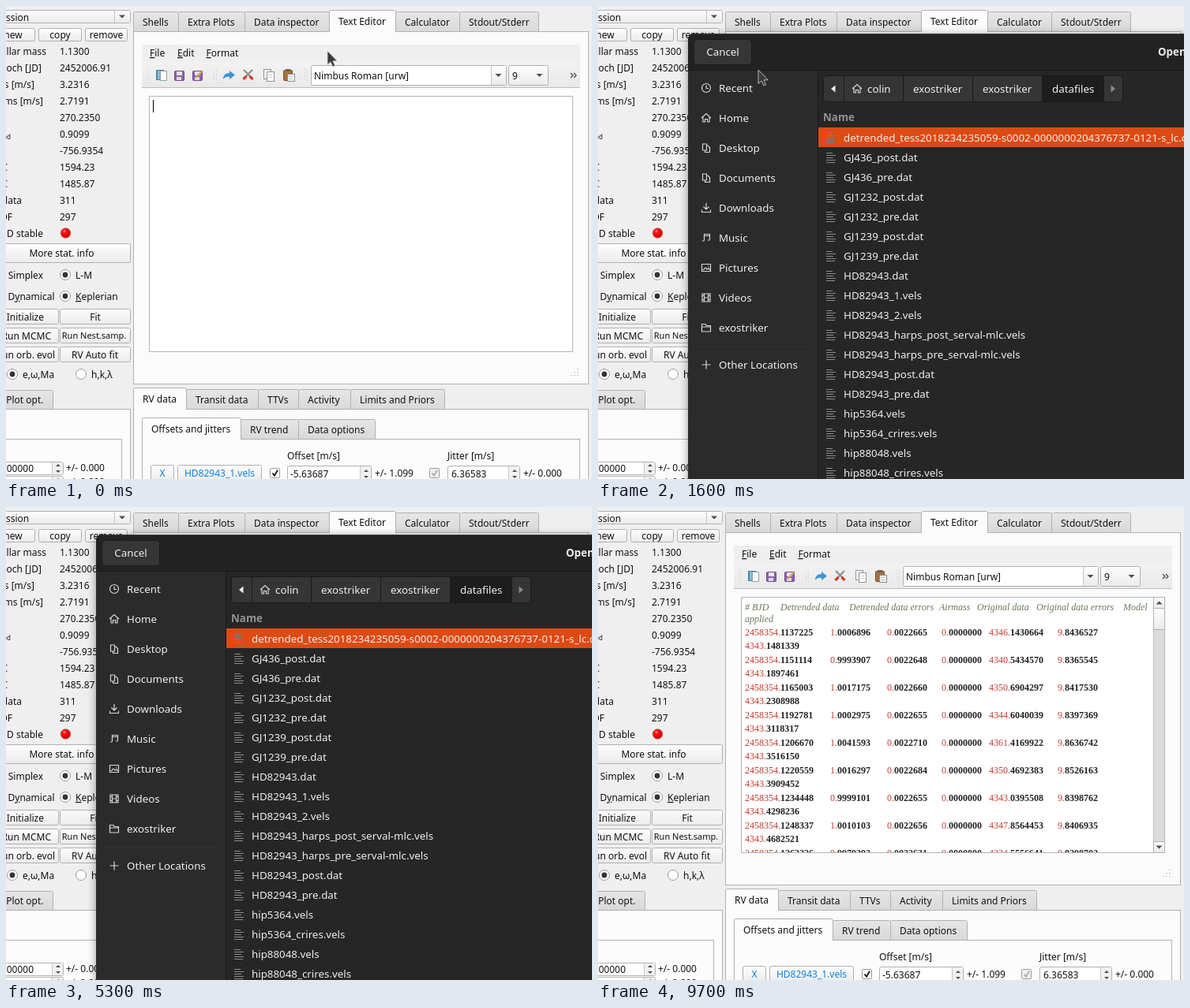
An HTML page that plays this animation: 742x600 px, repeating every 9900 ms.

```html
<!DOCTYPE html>
<html lang="en">
<head>
<meta charset="utf-8">
<title>Text editor: open file</title>
<style>
html, body { margin: 0; width: 100%; height: 100%; overflow: hidden; background: #efefef; }
svg { display: block; width: 742px; height: 600px; font: 12px "Noto Sans", sans-serif; fill: #111; }
text { white-space: pre; }
.u { text-decoration: underline; }
.dialog { font-size: 13.33px; fill: #eee; }
.doc { font: 12px "Liberation Serif", serif; }
</style>
</head>
<body>
<svg id="stage" viewBox="0 0 742 600">
  <defs>
    <linearGradient id="btn" x2="0" y2="1"><stop stop-color="#fdfdfd"/><stop offset="1" stop-color="#ebebeb"/></linearGradient>
    <linearGradient id="tab" x2="0" y2="1"><stop stop-color="#e6e6e6"/><stop offset="1" stop-color="#d9d9d9"/></linearGradient>
    <linearGradient id="bar" x2="0" y2="1"><stop stop-color="#f2f2f2"/><stop offset="1" stop-color="#e9e9e9"/></linearGradient>
    <radialGradient id="led" cx=".38" cy=".32"><stop stop-color="#ff9c9c"/><stop offset=".35" stop-color="#ff1515"/><stop offset="1" stop-color="#e00000"/></radialGradient>
    <filter id="soft" x="-10%" y="-10%" width="120%" height="120%"><feGaussianBlur stdDeviation="6"/></filter>
    <clipPath id="page"><path d="M182 115H703V438H182Z"/></clipPath>
  </defs>
  <g id="app"></g>
  <g id="highlight"></g>
  <text id="status" x="178" y="464">Open file</text>
  <g id="doc"></g>
  <path id="caret" d="M186.5 119V135" stroke="#000"/>
  <g id="dialog" class="dialog"></g>
  <path id="cursor" d="M0 0V17.5L4 14L6.8 20L9.6 18.7L7 12.8H12.3Z" fill="#3a3a3a" stroke="#d8d8d8" stroke-width=".8"/>
</svg>
<script>
const $ = id => document.getElementById(id);
const EDGE = '#b1b1b1';

const text = (x, y, s, attrs = '') => `<text x="${x}" y="${y}" ${attrs}>${s}</text>`;
const mid = (x, y, s, attrs = '') => text(x, y, s, `text-anchor="middle" ${attrs}`);
const end = (x, y, s, attrs = '') => text(x, y, s, `text-anchor="end" ${attrs}`);
const fillRect = (x, y, w, h, fill) => `<rect x="${x}" y="${y}" width="${w}" height="${h}" fill="${fill}"/>`;
const box = (x1, y1, x2, y2, fill, stroke = EDGE, r = 0) =>
  `<rect x="${x1 + .5}" y="${y1 + .5}" width="${x2 - x1 - 1}" height="${y2 - y1 - 1}" rx="${r}" fill="${fill}" stroke="${stroke}"/>`;
const line = (d, stroke = '#555', width = 1, fill = 'none') =>
  `<path d="${d}" fill="${fill}" stroke="${stroke}" stroke-width="${width}"/>`;
const shape = (d, fill) => `<path d="${d}" fill="${fill}"/>`;
const down = (x, y, s = 4) => shape(`M${x - s} ${y - s / 2}h${2 * s}l${-s} ${s}z`, '#4d4d4d');
const up = (x, y, s = 4) => shape(`M${x - s} ${y + s / 2}h${2 * s}l${-s} ${-s}z`, '#4d4d4d');
const under = s => `<tspan class="u">${s[0]}</tspan>${s.slice(1)}`;

const button = (x1, y1, x2, y2) => box(x1, y1, x2, y2, 'url(#btn)', EDGE, 2);

function tabs(list, top, bottom, active) {
  const draw = ([x1, x2, tx, label], i) => {
    const on = i === active, y = on ? top - 2 : top, b = on ? bottom + 1 : bottom;
    return line(`M${x1 + .5} ${b}V${y + 2.5}q0-2 2-2H${x2 - 1.5}q2 0 2 2V${b}`, EDGE, 1, on ? '#fcfcfc' : 'url(#tab)')
      + text(tx, on ? bottom - 8 : bottom - 7, label);
  };
  return list.map((t, i) => i === active ? '' : draw(t, i)).join('') + draw(list[active], active);
}

const radio = (x, y, on) =>
  `<circle cx="${x}" cy="${y}" r="6.5" fill="#fff" stroke="#999"/>` + (on ? `<circle cx="${x}" cy="${y}" r="3.4" fill="#333"/>` : '');

const check = (x, y, ink, fill) => box(x, y, x + 13, y + 13, fill, '#9a9a9a', 1)
  + line(`M${x + 3.5} ${y + 6.5}l2.5 3.2l4-7`, ink, 1.8);

const spin = (x1, y1, x2, y2) => {
  const x = x2 - 7, y = (y1 + y2) / 2;
  return box(x1, y1, x2, y2, '#fff', EDGE, 2) + fillRect(x2 - 14, y1 + 1, 13, y2 - y1 - 2, '#f1f1f1')
    + line(`M${x2 - 14.5} ${y1 + 1}V${y2 - 1}`, '#c6c6c6') + up(x, y - 4, 3) + down(x, y + 4, 3);
};

const combo = (x1, y1, x2, y2, sep, fill) => box(x1, y1, x2, y2, fill, EDGE, 2)
  + (sep ? fillRect(sep, y1 + 1, x2 - sep - 1, y2 - y1 - 2, 'url(#btn)') + line(`M${sep + .5} ${y1 + 1}V${y2 - 1}`, '#c2c2c2') : '');

function leftPanel() {
  const labels = [[51, 'Stellar mass', '1.1300'], [45, 'Epoch [JD]', '2452006.91'], [36, 'rms [m/s]', '3.2316'],
    [47, 'wrms [m/s]', '2.7191'], [0, '', '270.2350'], [0, '', '0.9099'], [0, '', '-756.9354'], [2, 'BIC', '1594.23'],
    [2, 'AIC', '1485.87'], [20, 'N data', '311'], [8, 'DOF', '297'], [47, 'AMD stable', '']];
  let s = combo(-9, 5, 158, 22, 137, 'url(#btn)') + down(147, 13.5) + text(0, 18.5, 'ssion');
  s += button(-9, 28, 37, 45) + button(41, 28, 96, 45) + button(100, 28, 154, 45);
  s += mid(9, 41, 'new') + mid(68.5, 41, 'copy') + mid(127, 41, 'remove');
  labels.forEach(([x, name, value], i) => { s += end(x, 62 + 21 * i, name) + text(68, 62 + 21 * i, value); });
  s += end(6, 168.5, 'red', 'font-size="8"') + '<circle cx="75.5" cy="288" r="6.5" fill="url(#led)" stroke="#a9a9a9" stroke-width=".6"/>';
  s += button(-9, 301, 158, 326) + mid(70.5, 318, 'More stat. info');
  s += end(47, 346, 'Simplex') + radio(75, 341, 1) + text(88, 346, 'L-M');
  s += end(61.5, 373, 'D<tspan class="u">y</tspan>namical') + radio(75, 368, 1) + text(88, 373, under('Keplerian'));
  for (const y of [384, 408, 432]) s += button(-9, y, 67, y + 20) + button(68, y, 158, y + 20);
  s += end(48, 399, 'Initialize') + mid(113, 399, 'Fit') + end(57, 423, 'Run MCMC');
  s += mid(111.5, 422, 'Run Nest.samp.', 'font-size="11"') + end(62, 447, 'Run orb. evol') + mid(112.5, 447, 'RV Auto fit');
  s += radio(8, 467, 1) + text(21, 472, 'e,ω,Ma') + radio(95, 467, 0) + text(108, 472, 'h,k,λ');
  s += line('M-5 511V487.5H57.5q2 0 2 2V511', EDGE, 1, 'url(#tab)') + end(47.5, 504, 'Plot opt.');
  s += box(-9, 511, 158, 620, '#fcfcfc') + box(-9, 549, 147, 620, '#fcfcfc');
  for (const y of [578, 596]) s += spin(-9, y, 73, y + 17) + end(35, y + 12.5, '0.00000') + text(76, y + 12, '+/- 0.000');
  return s;
}

function toolIcons() {
  const floppy = x => box(x - 6, 82, x + 7, 95, '#8b62ad', '#6d4a8c', 1) + fillRect(x - 3, 83, 7, 5, '#e9e2f0') + fillRect(x - 3, 90, 6, 4, '#ddd');
  let s = box(190, 81, 200, 94, '#5f9fbd', '#47809b') + box(195, 82, 204, 95, '#f8f8f8', '#8fa5b0') + line('M193.5 82V93', '#bfe0ee');
  s += floppy(219) + floppy(242) + line('M240 91L249 82', '#d0a24c', 2.2);
  s += shape('M275 93q0-8 8-8v-3l7 5.5l-7 5.5v-3q-5-1-8 3z', '#3d94d8');
  s += line('M301 81L311 91M312 81L302 91', '#8b8b8b', 2) + line('M304.5 89l-4 4M308.5 89l4 4', '#d83a32', 3.2);
  s += box(326, 80, 336, 93, '#fafafa', '#8d9298') + box(330, 83, 340, 96, '#fff', '#8d9298') + line('M332 87.5h5M332 90.5h5', '#ccc');
  s += box(351, 81, 363, 95, '#a8703d', '#77502d', 1) + fillRect(354, 80, 6, 3, '#666') + box(356, 86, 366, 96, '#f6f6f6', '#888') + line('M358 89.5h5M358 92.5h5', '#bbb');
  return s;
}

function rightPanel() {
  let s = box(161, 32, 738, 480, '#fbfbfb');
  s += tabs([[161, 218, 173, 'Shells'], [218, 302, 230, 'Extra Plots'], [302, 409, 314, 'Data inspector'], [409, 493, 421, 'Text Editor'],
    [493, 574, 505, 'Calculator'], [574, 674, 586, 'Stdout/Stderr']], 7, 32, 3);
  s += fillRect(172, 49, 555, 22, '#efefef') + fillRect(172, 71, 555, 32, 'url(#bar)') + line('M172 103.5H727', '#bdbdbd');
  s += text(182, 64, under('File')) + text(217, 64, under('Edit')) + text(253.5, 64, under('Format'));
  for (const x of [178, 263, 378]) s += line(`M${x + .5} 80V96M${x + 3.5} 81.5V96`, '#bcbcbc').replace('/>', ' stroke-dasharray="1 3"/>');
  s += toolIcons() + combo(386, 75, 634, 101, 614, '#fff') + text(390, 93, 'Nimbus Roman [urw]') + down(623.5, 88);
  s += combo(636, 75, 687, 101, 0, 'url(#btn)') + text(641, 93, '9') + down(675.5, 88);
  s += line('M715 85l3 3l-3 3M719 85l3 3l-3 3', '#444', 1.2);
  s += box(181, 114, 718, 439, '#fff', '#b4b4b4');
  for (let i = 0; i < 3; i++) s += line(`M${723 - 4 * i} ${460.5 + 0 * i}`, '#bbb');
  s += line('M723 460.5h2M719 464.5h2M723 464.5h2M715 468.5h2M719 468.5h2M723 468.5h2', '#c0c0c0');

  s += box(161, 511, 738, 620, '#fbfbfb');
  s += tabs([[161, 228, 173, 'RV data'], [228, 319, 240, 'Transit data'], [319, 370, 331, 'TTVs'], [370, 436, 382, 'Activity'],
    [436, 555, 448, 'Limits and Priors']], 486, 511, 0);
  s += box(172, 549, 727, 620, '#fcfcfc');
  s += tabs([[172, 297, 184, 'Offsets and jitters'], [297, 370, 309, 'RV trend'], [370, 467, 382, 'Data options']], 524, 549, 0);
  s += text(356, 575, 'Offset [m/s]') + text(559, 575, 'Jitter [m/s]');
  s += button(183, 582, 213, 604) + button(217, 582, 324, 604);
  s += mid(198, 597, 'X', 'fill="#1180d8"') + mid(270.5, 597, 'HD82943_1.vels', 'fill="#1180d8"');
  s += check(334, 586, '#111', '#fff') + spin(356, 583, 463, 604) + text(360, 598, '-5.63687') + text(467, 597, '+/- 1.099');
  s += check(536, 586, '#aaa', '#f0f0f0') + spin(559, 583, 651, 604) + text(564, 598, '6.36583') + text(655, 597, '+/- 0.000');
  return s;
}

function documentText() {
  const heads = [[186, '# BJD'], [231, 'Detrended data'], [318, 'Detrended data errors'], [432, 'Airmass'], [480, 'Original data'],
    [555, 'Original data errors'], [665, 'Model']];
  const rows = `1137225 1.0006896 0.0022665 4346.1430664 9.8436527 4343.1481339
1151114 0.9993907 0.0022648 4340.5434570 9.8365545 4343.1897461
1165003 1.0017175 0.0022660 4350.6904297 9.8417530 4343.2308988
1192781 1.0002975 0.0022655 4344.6040039 9.8397369 4343.3118317
1206670 1.0041593 0.0022710 4361.4169922 9.8636742 4343.3516150
1220559 1.0016297 0.0022684 4350.4692383 9.8526163 4343.3909452
1234448 0.9999101 0.0022655 4343.0395508 9.8398762 4343.4298236
1248337 1.0010103 0.0022656 4347.8564453 9.8406935 4343.4682521
1262226 0.9979392 0.0022631 4334.5556641 9.8298702 4343.5062321`.split('\n');
  const number = (x, y, n) => {
    const [a, b] = n.split('.');
    return text(x, y, `${a}.<tspan fill="#222" font-weight="bold">${b}</tspan>`, 'fill="#c23b30"');
  };
  let s = '<g font-style="italic" fill="#66795a">' + heads.map(([x, h]) => text(x, 131, h)).join('') + text(186, 146, 'applied') + '</g>';
  rows.forEach((row, i) => {
    const [bjd, flux, err, raw, rawErr, model] = row.split(' '), y = 163 + 35 * i;
    s += number(186, y, '2458354.' + bjd) + number(294, y, flux) + number(366, y, err) + number(435, y, '0.0000000')
      + number(495, y, raw) + number(582, y, rawErr) + number(186, y + 17, model);
  });
  return `<g class="doc" clip-path="url(#page)">${s}</g>` + fillRect(703, 115, 14, 323, '#dcdcdc') + line('M703.5 115V438', '#c2c2c2')
    + box(703, 114, 718, 129, 'url(#btn)') + box(703, 128, 718, 156, 'url(#btn)') + box(703, 424, 718, 439, 'url(#btn)')
    + up(710.5, 121.5) + down(710.5, 431.5);
}

function dialogWindow() {
  const ink = '#d6d6d6';
  const home = 'M-6 0L0-5.5L6 0M-4-1V5H-1.5V1.5H1.5V5H4V-1';
  const pages = 'M-4.5-5H0.5V3H-4.5ZM-1.5 3V5.5H4.5V-.5L2-3H.5';
  const places = [
    ['Recent', 'M5.5 0A5.5 5.5 0 1 1-5.5 0A5.5 5.5 0 1 1 5.5 0M0-3.5V.5H3'], ['Home', home], ['Desktop', pages], ['Documents', pages],
    ['Downloads', 'M0-6V2M-3.5-1.5L0 2L3.5-1.5M-5.5 2.5V5.5H5.5V2.5'],
    ['Music', 'M-2.5 3.5V-4.5H4.5V2.5M-2.5-2.5H4.5M-5 4H-2.5M2 3H4.5'],
    ['Pictures', 'M-5.5-4.5H5.5V4.5H-5.5ZM-4 3L-1 0L1 2L3 .5L4.5 3M2-2h1'],
    ['Videos', 'M-5-5H5V5H-5ZM-2.5-5V5M2.5-5V5M-2.5 0H2.5M-5-2.5H-2.5M-5 2.5H-2.5M5-2.5H2.5M5 2.5H2.5'],
    ['exostriker', 'M-5.5 5V-4.5H-1L0-2.5H5.5V5ZM-5.5-1H5.5']];
  const files = ['detrended_tess2018234235059-s0002-0000000204376737-0121-s_lc.dat',
    ...['GJ436', 'GJ1232', 'GJ1239'].flatMap(n => [n + '_post.dat', n + '_pre.dat']),
    'HD82943.dat', 'HD82943_1.vels', 'HD82943_2.vels', 'HD82943_harps_post_serval-mlc.vels', 'HD82943_harps_pre_serval-mlc.vels',
    'HD82943_post.dat', 'HD82943_pre.dat', 'hip5364.vels', 'hip5364_crires.vels', 'hip88048.vels', 'hip88048_crires.vels', 'hip88048_sato12.vels'];
  const icon = (x, y, d) => `<g transform="translate(${x} ${y})">${line(d, ink, 1.2)}</g>`;

  let s = '<rect x="114" y="37" width="720" height="866" rx="8" fill="#000" opacity=".4" filter="url(#soft)"/>';
  s += '<rect x="114" y="35" width="720" height="866" rx="8" fill="#262626"/>';
  s += shape('M114 82V43q0-8 8-8H834V82Z', '#222') + line('M122 35.5H834', '#3a3a3a');
  s += fillRect(114, 82, 164, 819, '#2b2b2b') + line('M114 81.5H834M278.5 82V901', '#191919');
  s += box(121, 42, 195, 75, '#363636', '#1a1a1a', 4) + mid(158, 63, 'Cancel') + text(709, 63, 'Open File', 'font-weight="bold"');
  places.forEach(([name, d], i) => { s += icon(137, 104 + 38 * i, d) + text(153, 109 + 38 * i, name); });
  s += line('M122 431.5H270', '#323232') + icon(137, 455, 'M-5.5 0H5.5M0-5.5V5.5') + text(153, 460, 'Other Locations');

  s += box(285, 88, 665, 122, '#353535', '#1a1a1a', 4) + fillRect(562, 89, 78, 32, '#1d1d1d');
  s += line('M311.5 89V121M386.5 89V121M474.5 89V121M562.5 89V121M640.5 89V121', '#1a1a1a');
  s += shape('M300.5 100.5V109.5L295 105Z', '#eee') + '<path id="next" d="M649.5 100.5V109.5L655 105Z"/>';
  s += icon(328, 105, home) + text(341, 110, 'colin') + text(399, 110, 'exostriker') + text(487, 110, 'exostriker') + text(575, 110, 'datafiles');
  s += text(285, 146, 'Name', 'font-weight="bold" fill="#929292"') + fillRect(279, 154, 555, 25, '#dd4a14');
  files.forEach((name, i) => {
    const y = 167 + 25 * i;
    s += line(`M289 ${y - 5.5}h8M289 ${y - 2.5}h12M289 ${y + .5}h9M289 ${y + 3.5}h12M289 ${y + 6.5}h11`, i ? '#8b8b8b' : '#7e7a80');
    s += text(311, y + 5, name);
  });
  return s;
}

$('app').innerHTML = leftPanel() + rightPanel();
$('highlight').innerHTML = fillRect(178, 49, 28, 22, '#308cc6') + text(182, 64, under('File'), 'fill="#fff"');
$('doc').innerHTML = documentText();
$('dialog').innerHTML = dialogWindow();

const LOOP = 9900, STEP = 100, DIALOG_MID = 468;
// time, x, y of the pointer tip
const path = [[0, 407, 57], [300, 330, 60], [600, 196, 61], [900, 192, 63], [1000, 200, 78], [1100, 203, 81], [1600, 203, 81],
  [2300, 310, 176], [2400, 326, 172], [2500, 335, 165], [5100, 335, 165], [5200, 695, 176]];

function pointer(t) {
  const i = path.findIndex(p => p[0] > t);
  if (i < 0) return path[path.length - 1].slice(1);
  const [t0, x0, y0] = path[i - 1], [t1, x1, y1] = path[i], k = (t - t0) / (t1 - t0);
  return [x0 + (x1 - x0) * k, y0 + (y1 - y0) * k];
}

const show = (id, on) => $(id).setAttribute('visibility', on ? 'visible' : 'hidden');
const within = (t, a, b) => t >= a && t < b;

function draw(now) {
  const t = Math.floor(now % LOOP / STEP) * STEP;
  const grow = t < 1600 ? .87 : 1;
  show('highlight', within(t, 700, 1500));
  show('status', within(t, 1000, 1500));
  show('doc', t >= 5700);
  show('caret', t < 700 || within(t, 1500, 6900) || within(t, 7500, 8100) || within(t, 8800, 9700));
  show('dialog', within(t, 1500, 5700));
  $('dialog').setAttribute('opacity', grow);
  $('dialog').setAttribute('transform', `translate(0 ${DIALOG_MID * (1 - grow)}) scale(1 ${grow})`);
  $('next').setAttribute('fill', t < 1600 ? '#eee' : '#8a8a8a');
  show('cursor', t < 5300);
  $('cursor').setAttribute('transform', `translate(${pointer(t).map(Math.round).join(' ')})`);
}

function frame() {
  draw(performance.now());
  requestAnimationFrame(frame);
}
frame();
</script>
</body>
</html>
```
